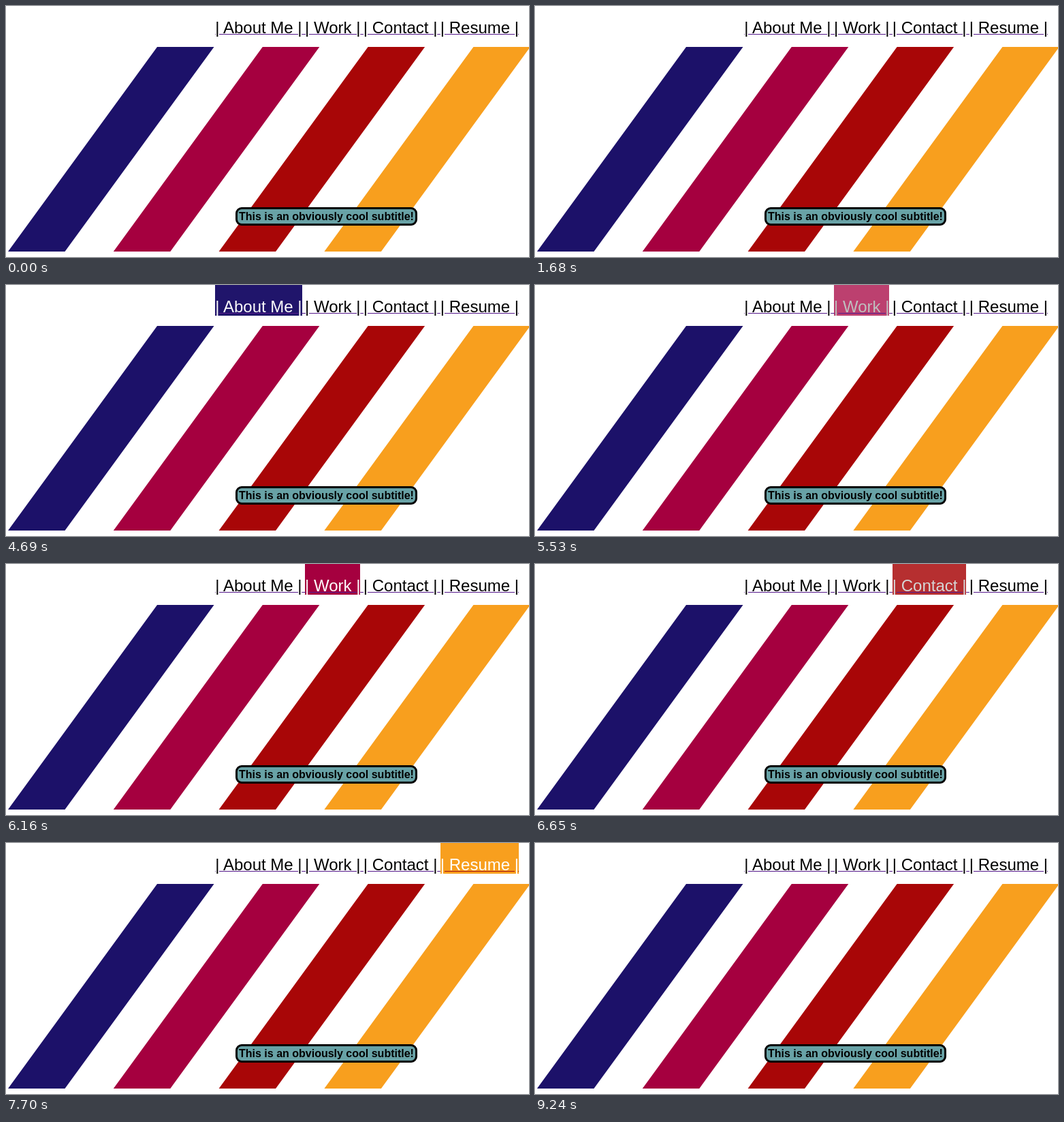
Recreate the animation shown at these times as an HTML page. Size 768x368 px, loop 9.31 s.

```html
<!DOCTYPE html>
<html lang="en">
<head>
<meta charset="utf-8">
<title>Portfolio header</title>
<style>
  html, body { margin: 0; width: 100%; height: 100%; overflow: hidden; background: #fff; }
  body { position: relative; font: 16px "Liberation Sans", Arial, sans-serif; color: #000; }
  svg { position: absolute; left: 0; top: 0; }
  nav { position: absolute; right: 15px; top: 18px; line-height: 28px; white-space: nowrap; }
  nav a { color: #551a8b; text-decoration: underline; }
  nav span { font-size: 24px; color: #000; padding-top: 20px; }
  h2 {
    position: absolute; left: 337px; top: 295px; width: 267px; height: 27px;
    box-sizing: border-box; margin: 0; padding: 2px; border: 3px solid #000; border-radius: 9px;
    background: #68a2a6; font-size: 16px; line-height: 17px; white-space: nowrap;
  }
</style>
</head>
<body>
<svg width="768" height="368"></svg>
<nav></nav>
<h2>This is an obviously cool subtitle!</h2>
<script>
  const LOOP = 9310, FADE = 600;
  const links = [
    { text: "About Me", color: "#1c1169", from: 4190, to: 5260 },
    { text: "Work", color: "#a5003f", from: 5260, to: 6330 },
    { text: "Contact", color: "#a80607", from: 6330, to: 7130 },
    { text: "Resume", color: "#f89f1e", from: 7130, to: 9030, line: "#a01010" }
  ];
  const svg = document.querySelector("svg");
  const nav = document.querySelector("nav");

  // Fades in with ease, holds, then drops at once.
  function hover(el, off, on, { from, to }) {
    const key = (ms, style, easing = "linear") => ({ offset: ms / LOOP, easing, ...style });
    el.animate([
      key(0, off), key(from, off, "ease"), key(from + FADE, on),
      key(to, on), key(to, off), key(LOOP, off)
    ], { duration: LOOP, iterations: Infinity });
  }

  function addStripe(color, i) {
    const x = 3 + i * 154.8;
    const stripe = document.createElementNS("http://www.w3.org/2000/svg", "path");
    stripe.setAttribute("d", `M${x + 219} 60h83.5L${x + 83.5} 360H${x}z`);
    stripe.setAttribute("fill", color);
    svg.append(stripe);
  }

  function addLink(link) {
    const a = document.createElement("a");
    const label = document.createElement("span");
    label.textContent = `| ${link.text} |`;
    a.append(label, " ");
    nav.append(a);
    hover(label,
      { backgroundColor: "#ffffff", color: "#000000" },
      { backgroundColor: link.color, color: "#ffffff" }, link);
    if (link.line) hover(a, { color: "#551a8b" }, { color: link.line }, link);
  }

  links.forEach((link, i) => {
    addStripe(link.color, i);
    addLink(link);
  });
</script>
</body>
</html>
```
